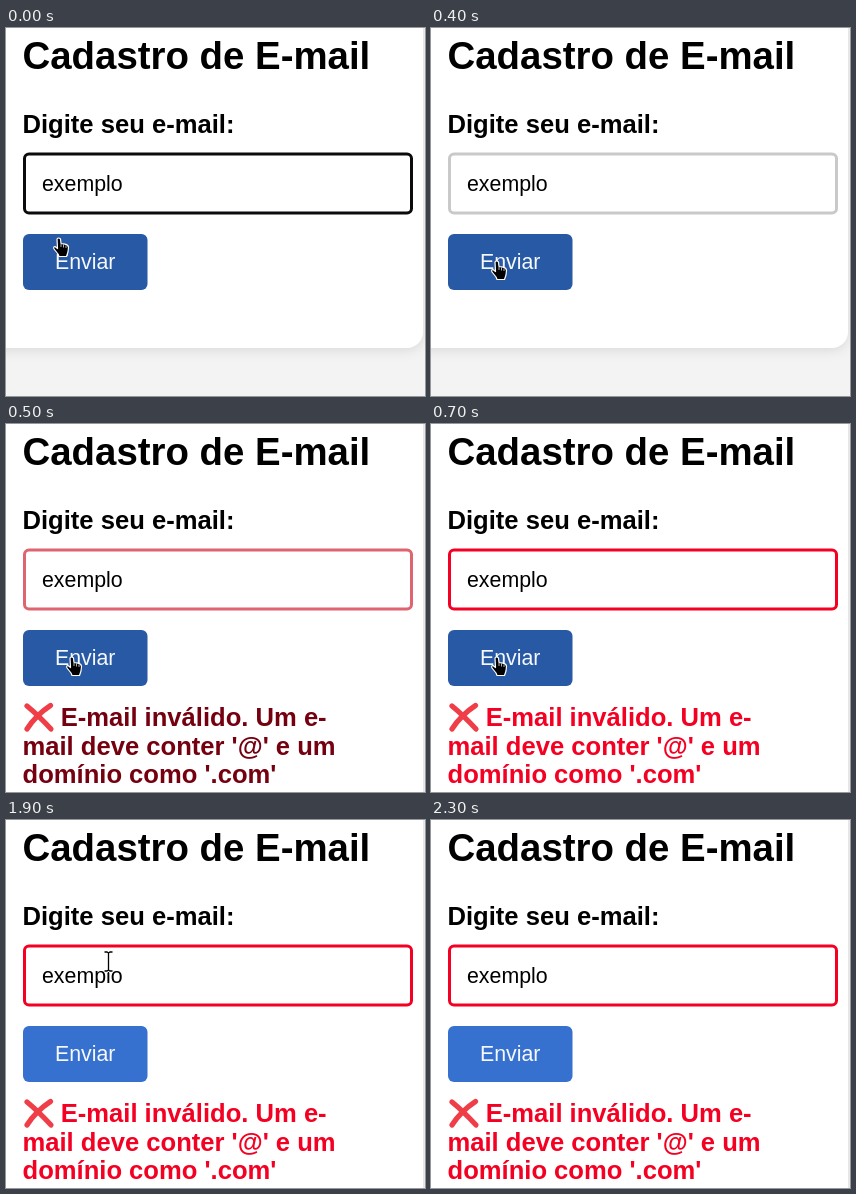
Animation of 419 by 368 pixels, one loop 2.9 s. Source, as an HTML page:

```html
<!DOCTYPE html>
<html lang="pt-BR">
<head>
<meta charset="utf-8">
<title>Cadastro de E-mail</title>
<style>
  html, body { margin: 0; width: 100%; height: 100%; overflow: hidden; background: #f3f3f3; }
  svg { display: block; width: 419px; height: 368px; font-family: "Liberation Sans", Arial, sans-serif; }
  .card { fill: #fff; filter: drop-shadow(0 2px 6px rgba(0, 0, 0, .11)); }
  .bold { font-size: 25.6px; font-weight: bold; }
  .field { font-size: 21.33px; }
</style>
</head>
<body>
<svg viewBox="0 0 419 368">
  <rect id="card" class="card" x="-60" y="-60" width="477" height="380" rx="16"/>
  <text x="16.5" y="41" font-size="38.4" font-weight="bold">Cadastro de E-mail</text>
  <text x="16.5" y="105" class="bold">Digite seu e-mail:</text>
  <rect id="input" x="18.5" y="126" width="387" height="59" rx="4.5" fill="#fff" stroke-width="3"/>
  <text x="36" y="163" class="field">exemplo</text>
  <path id="caret" d="M117.5 144V168" stroke="#000" stroke-width="1.3"/>
  <rect id="button" x="17" y="206" width="124.5" height="56" rx="6"/>
  <text x="49" y="241" class="field" fill="#f6f8fc">Enviar</text>
  <g id="error" class="bold">
    <g fill="none" stroke="#ef3e48" stroke-width="5.2" stroke-linecap="round">
      <path d="M21 282Q32 291 45 305"/>
      <path d="M44.500 281.500Q30 291 21 305"/>
    </g>
    <text x="54.700" y="302">E-mail inválido. Um e-</text>
    <text x="16.500" y="331">mail deve conter '@' e um</text>
    <text x="16.500" y="359">domínio como '.com'</text>
  </g>
  <g id="hand">
    <path d="M4 2Q5.500 0 7.500 2L8 6.500L12 7.200Q15.500 8 15.500 10.500L15 15L13.500 19.500H6L5 17L1 12Q0 9.500 2 9.500L4.500 11.500Z" stroke="#fff" stroke-width="1.2" stroke-linejoin="round"/>
    <path d="M8 7V10M10.500 7.500V10.500M13 8.500V11" stroke="#fff" stroke-width=".7"/>
  </g>
  <g id="beam" fill="none">
    <path id="beamShape" d="M-4 -9.500H-1.500L0 -8.500L1.500 -9.500H4M0 -8.500V8.500M-4 9.500H-1.500L0 8.500L1.500 9.500H4" stroke="#fff" stroke-width="3"/>
    <use href="#beamShape" style="stroke:#000"/>
    <path d="M-4 -9.500H-1.500L0 -8.500L1.500 -9.500H4M0 -8.500V8.500M-4 9.500H-1.500L0 8.500L1.500 9.500H4" stroke="#000" stroke-width="1.3"/>
  </g>
</svg>
<script>
const $ = id => document.getElementById(id);
const set = (id, name, value) => $(id).setAttribute(name, value);
const show = (id, visible) => set(id, 'visibility', visible ? 'visible' : 'hidden');
const move = (id, [x, y]) => set(id, 'transform', `translate(${x} ${y})`);

// Latest value whose start time has been reached
const at = (t, steps) => steps.filter(([start]) => start <= t).pop()[1];

const border = [[0, '#0b0b0e'], [400, '#c9c9c9'], [500, '#de6470'], [600, '#ec0024'], [700, '#f30022']];
const message = [[0, '#000'], [500, '#75000f'], [600, '#d9001d'], [700, '#f30022']];
const handPath = [[0, [47, 209]], [100, [55, 222]], [200, [60, 232]]];
const beamPath = [[0, [102.5, 141.5]], [2000, [112, 92]], [2100, [117, 52]], [2200, [120, 16]]];

function draw(now) {
  const t = now % 2900;
  const failed = t >= 500;
  set('card', 'height', failed ? 500 : 380);
  set('input', 'stroke', at(t, border));
  set('button', 'fill', t < 1900 ? '#2859a4' : '#3771cf');
  set('error', 'fill', at(t, message));
  show('error', failed);
  show('caret', t >= 100 && t < 400);
  show('hand', t < 1900);
  show('beam', t >= 1900 && t < 2300);
  move('hand', at(t, handPath));
  move('beam', at(t, beamPath));
  requestAnimationFrame(draw);
}
draw(0);
</script>
</body>
</html>
```
